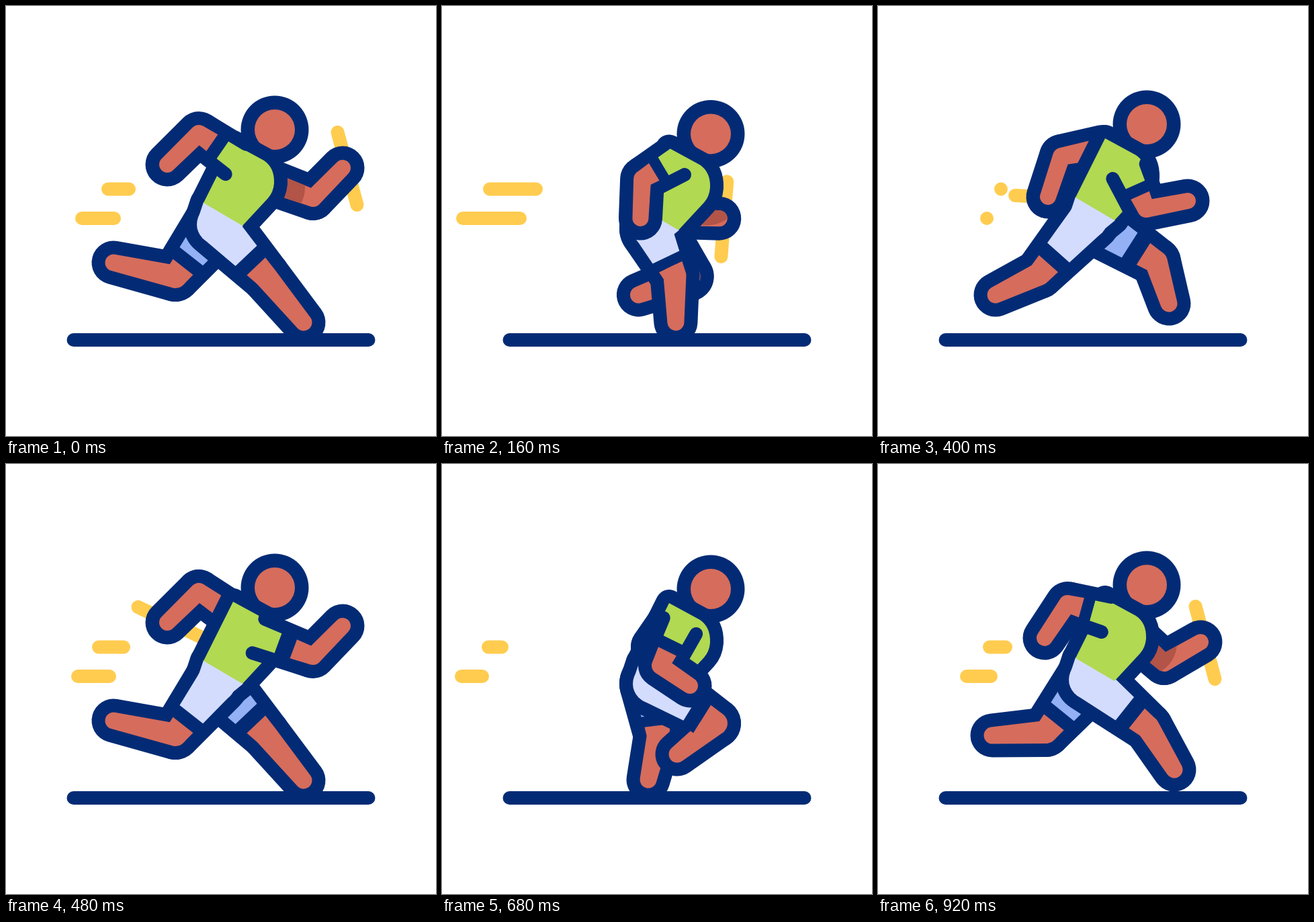
Write an HTML page with a canvas that moves like this. It is 640x640 px and loops after 0.96 s.

```html
<!DOCTYPE html>
<html lang="en">
<head>
<meta charset="utf-8">
<title>Relay runner</title>
<style>
  html, body { margin: 0; height: 100%; overflow: hidden; background: #fff; }
  canvas { display: block; }
</style>
</head>
<body>
<canvas id="stage" width="640" height="640"></canvas>
<script>
const ctx = document.getElementById('stage').getContext('2d');
const LOOP = 960, HALF = 480, STEP = 40, EDGE = 20;
const NAVY = '#032b75', SKIN = '#d66c5c', SHADE = '#b25447', GREEN = '#b1d951',
      SHORTS = '#d3dcfd', FAR_SHORTS = '#93b1f4', YELLOW = '#ffcc4f';

// Rows: time, then values. Far limbs use the same cycles half a loop later.
const ARM = [ // shoulder, elbow, hand
  [0, 342, 228, 287, 190, 240, 236], [80, 346, 231, 276, 227, 233, 291],
  [200, 348, 226, 314, 272, 335, 325], [240, 352, 224, 341, 285, 389, 328],
  [400, 374, 246, 399, 302, 461, 290], [440, 376, 252, 426, 296, 480, 265],
  [480, 376, 256, 457, 286, 501, 241], [560, 373, 271, 436, 322, 486, 279],
  [680, 354, 241, 325, 300, 369, 330], [720, 346, 222, 297, 250, 312, 320],
  [880, 335, 212, 273, 224, 253, 284], [920, 340, 224, 282, 208, 248, 259]
];
const LEG = [ // knee, foot
  [0, 386, 402, 443, 471], [80, 388, 395, 420, 473], [200, 322, 404, 307, 470],
  [240, 296, 400, 261, 473], [400, 240, 399, 175, 430], [440, 250, 399, 170, 404],
  [480, 252, 403, 160, 382], [560, 286, 428, 189, 421], [680, 408, 386, 350, 432],
  [720, 427, 371, 408, 434], [880, 414, 381, 433, 443], [920, 402, 392, 441, 455]
];
const BOB = [[0, 0], [80, 13], [200, 2], [240, 0], [400, -8], [440, -4]];
const BATON_TURN = [[0, 75], [80, 75], [240, 120], [400, 183], [560, 208], [680, 120], [920, 75]];
const SPEED = [ // left and right end of the upper line, then of the lower one
  [0, 152, 183, 113, 161], [80, 112, 167, 72, 145], [160, 71, 140, 31, 116],
  [240, 70, 109, 30, 83], [340, 70, 70, 30, 40], [400, 183, 183, 162, 162],
  [480, 138, 175, 107, 154], [560, 71, 150, 31, 129], [680, 69, 89, 29, 60],
  [740, 69, 69, 29, 29], [840, 191, 191, 171, 171], [920, 166, 190, 132, 168]
];

// Periodic interpolation through the rows, smooth or linear.
function sample(rows, time, period = LOOP, smooth = true) {
  const t = time % period, n = rows.length;
  const row = i => {
    const turn = Math.floor(i / n), [at, ...values] = rows[i - turn * n];
    return [at + turn * period, ...values];
  };
  const i = rows.findLastIndex(r => r[0] <= t);
  const [a, b, c, d] = [i - 1, i, i + 1, i + 2].map(row);
  const span = c[0] - b[0], u = (t - b[0]) / span;
  return b.slice(1).map((from, j) => {
    const k = j + 1, to = c[k];
    if (!smooth) return from + (to - from) * u;
    const m0 = (to - a[k]) / (c[0] - a[0]) * span;
    const m1 = (d[k] - from) / (d[0] - b[0]) * span;
    const e = to - from;
    return from + u * (m0 + u * (3 * e - 2 * m0 - m1 + u * (m0 + m1 - 2 * e)));
  });
}

const mix = (a, b, u) => [a[0] + (b[0] - a[0]) * u, a[1] + (b[1] - a[1]) * u];

function side(a, b, r) {
  const d = Math.hypot(b[0] - a[0], b[1] - a[1]) || 1;
  return [-(b[1] - a[1]) / d * r, (b[0] - a[0]) / d * r];
}

function fill(path, color) {
  ctx.fillStyle = color;
  ctx.fill(path);
}

function line(a, b, color = NAVY) {
  ctx.strokeStyle = color;
  ctx.lineWidth = 20;
  ctx.beginPath();
  ctx.moveTo(...a);
  ctx.lineTo(...b);
  ctx.stroke();
}

function disc([x, y], r, color) {
  const path = new Path2D();
  path.arc(x, y, r, 0, 7);
  fill(path, color);
}

function polygon(points) {
  const path = new Path2D();
  points.forEach(p => path.lineTo(...p));
  path.closePath();
  return path;
}

// Square-ended taper between two joints.
function taper(a, b, ra, rb) {
  const [ax, ay] = side(a, b, ra), [bx, by] = side(a, b, rb);
  return polygon([[a[0] - ax, a[1] - ay], [b[0] - bx, b[1] - by],
                  [b[0] + bx, b[1] + by], [a[0] + ax, a[1] + ay]]);
}

// Round-ended taper.
function capsule(a, b, ra, rb) {
  const path = new Path2D();
  const angle = Math.atan2(b[1] - a[1], b[0] - a[0]);
  const spread = Math.acos((ra - rb) / Math.hypot(b[0] - a[0], b[1] - a[1]));
  path.arc(...a, ra, angle + spread, angle - spread + 2 * Math.PI);
  path.arc(...b, rb, angle - spread, angle + spread);
  path.closePath();
  return path;
}

function armAt(t) {
  const [sx, sy, ex, ey, hx, hy] = sample(ARM, t);
  return { shoulder: [sx, sy], elbow: [ex, ey], hand: [hx, hy] };
}

function legAt(t, hip) {
  const [kx, ky, fx, fy] = sample(LEG, t);
  return { hip, knee: [kx, ky], foot: [fx, fy] };
}

function legOutline({ hip, knee, foot }) {
  fill(capsule(hip, knee, 29 + EDGE, 17 + EDGE), NAVY);
  fill(capsule(knee, foot, 17 + EDGE, 12.5 + EDGE), NAVY);
}

function legFill({ hip, knee, foot }, cloth) {
  const cuff = mix(hip, knee, 0.61), hem = mix(hip, knee, 0.81);
  fill(capsule(knee, foot, 17, 12.5), SKIN);
  fill(taper(hem, knee, 19, 17), SKIN);
  fill(taper(cuff, hem, 30, 30), NAVY);
  disc(hip, 29, cloth);
  fill(taper(hip, cuff, 29, 22), cloth);
}

function farArm({ shoulder, elbow, hand }, turn, bob) {
  const grip = [hand[0] + 7, hand[1] + 1];
  const dx = 56 * Math.cos(turn * Math.PI / 180), dy = 56 * Math.sin(turn * Math.PI / 180);
  line([grip[0] - dx, grip[1] - dy], [grip[0] + dx, grip[1] + dy], YELLOW);
  fill(capsule(shoulder, elbow, 35, 33), NAVY);
  fill(capsule(elbow, hand, 33, 32.5), NAVY);
  const skin = capsule(shoulder, elbow, 16, 13);
  skin.addPath(capsule(elbow, hand, 13, 12));
  fill(skin, SKIN);
  ctx.save();
  ctx.clip(skin);
  disc([395, 270 + bob], 50, SHADE);
  ctx.restore();
}

function nearArm({ shoulder, elbow, hand }) {
  const cuff = mix(shoulder, elbow, 0.36), hem = mix(shoulder, elbow, 0.64);
  fill(taper(shoulder, cuff, 18, 18), GREEN);
  fill(taper(cuff, elbow, 34, 33), NAVY);
  fill(capsule(elbow, hand, 33, 32.5), NAVY);
  const [sx, sy] = side(shoulder, elbow, 27), [ex, ey] = side(shoulder, elbow, 23);
  for (const s of [-1, 1])
    line([shoulder[0] + s * sx, shoulder[1] + s * sy], [elbow[0] + s * ex, elbow[1] + s * ey]);
  fill(taper(hem, elbow, 15, 13), SKIN);
  fill(capsule(elbow, hand, 13, 12), SKIN);
}

const shirt = new Path2D('M338 205 L384 230 Q400 241 399 264 Q398 277 390 286 L352 327 L294 293 Z');
const waist = polygon([[294, 292], [353, 327], [331, 345], [286, 316]]);

function shifted(dy, draw) {
  ctx.save();
  ctx.translate(0, dy);
  draw();
  ctx.restore();
}

function speedLines(t) {
  if ((t > 340 && t < 400) || (t > 720 && t < 840)) return;
  const [l1, r1, l2, r2] = sample(SPEED, t, LOOP, false);
  line([l1, 272.5], [r1, 272.5], YELLOW);
  line([l2, 316], [r2, 316], YELLOW);
}

function draw(t) {
  const [bob] = sample(BOB, t, HALF), [turn] = sample(BATON_TURN, t);
  const hip = [313, 325 + bob];
  const nearLeg = legAt(t, hip), farLeg = legAt(t + HALF, hip);

  ctx.fillStyle = '#fff';
  ctx.fillRect(0, 0, 640, 640);
  ctx.lineCap = ctx.lineJoin = 'round';

  speedLines(t);
  line([100.5, 497], [539.5, 497]);
  farArm(armAt(t + HALF), turn, bob);
  legOutline(farLeg);
  legFill(farLeg, FAR_SHORTS);
  disc([400, 184 + bob], 50.5, NAVY);
  disc([400, 184 + bob], 30, SKIN);

  shifted(bob, () => {
    ctx.strokeStyle = NAVY;
    ctx.lineWidth = 2 * EDGE;
    ctx.stroke(shirt);
    ctx.stroke(waist);
  });
  legOutline(nearLeg);
  legFill(nearLeg, SHORTS);
  shifted(bob, () => {
    fill(waist, SHORTS);
    fill(shirt, GREEN);
  });
  nearArm(armAt(t));
}

// The animation runs at 25 poses per second.
function tick() {
  draw(Math.floor(performance.now() % LOOP / STEP) * STEP);
  requestAnimationFrame(tick);
}
tick();
</script>
</body>
</html>
```
